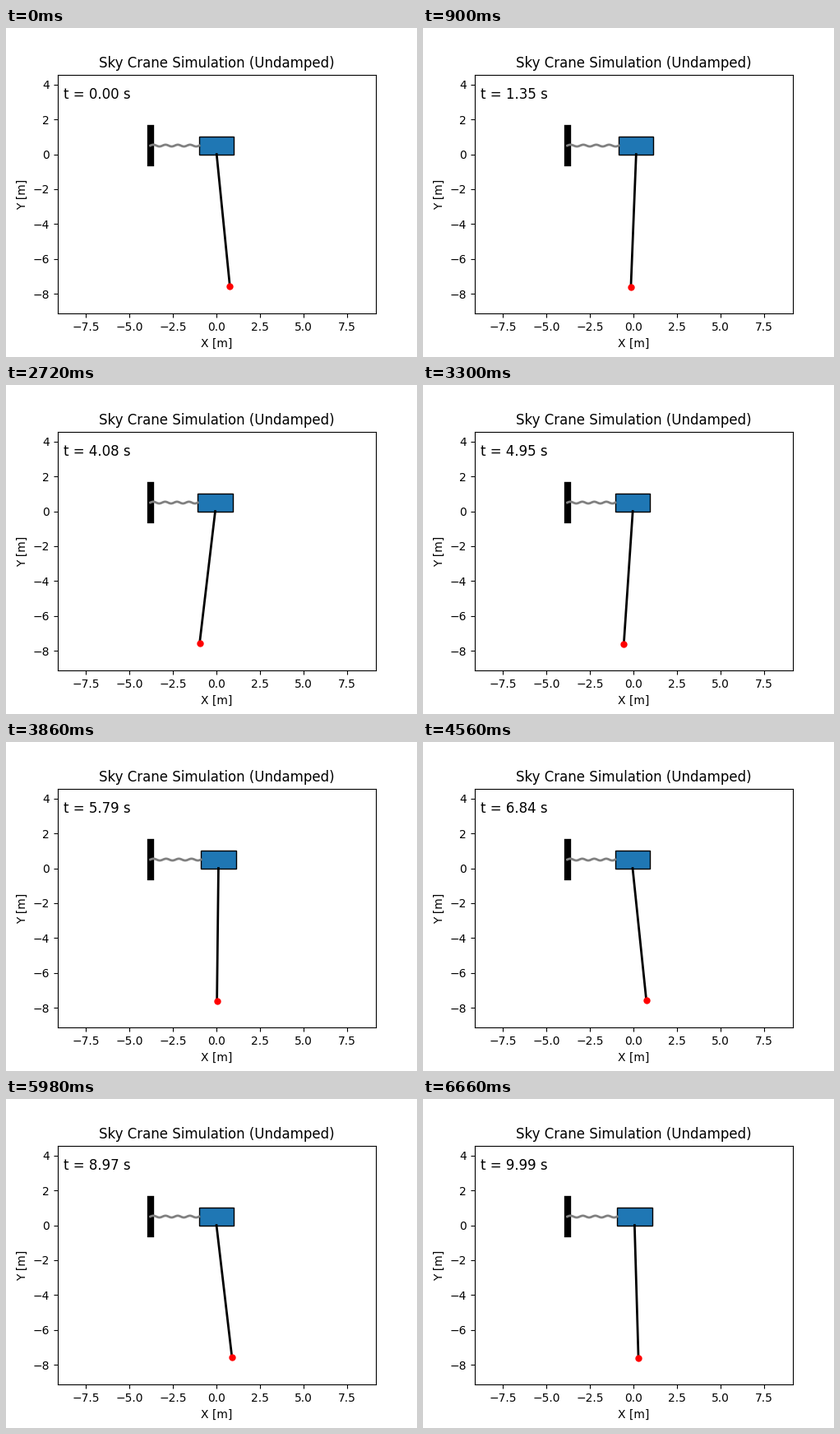
A matplotlib script for the animation above (6680 ms loop, 500 by 400 pixels).

```python
import numpy as np
import matplotlib.pyplot as plt
from matplotlib.animation import FuncAnimation
from matplotlib.patches import Rectangle

G = 3.71            # Mars gravity [m/s^2]
L = 7.62            # bridle length [m]
MASS_RATIO = 0.78   # payload mass / carriage mass
STIFFNESS = 9.27    # spring constant / carriage mass [1/s^2]
FRAMES, DT, SUBSTEPS = 334, 0.03, 6
CART_W, CART_H = 2.0, 1.0
WALL_X = -L / 2


def deriv(s):
    x, th, v, w = s
    sin, cos = np.sin(th), np.cos(th)
    acc = (-STIFFNESS * x + MASS_RATIO * sin * (G * cos + L * w**2)) / (1 + MASS_RATIO * sin**2)
    return np.array([v, w, acc, -(acc * cos + G * sin) / L])


def rk4(s, h):
    k1 = deriv(s)
    k2 = deriv(s + h / 2 * k1)
    k3 = deriv(s + h / 2 * k2)
    k4 = deriv(s + h * k3)
    return s + h / 6 * (k1 + 2 * k2 + 2 * k3 + k4)


def simulate():
    s = np.array([0.0, 0.1, -0.5, 0.0])
    states = [s]
    for _ in range(FRAMES - 1):
        for _ in range(SUBSTEPS):
            s = rk4(s, DT / SUBSTEPS)
        states.append(s)
    return np.array(states)


states = simulate()

fig, ax = plt.subplots(figsize=(5, 4), dpi=100)
ax.set_xlim(-1.2 * L, 1.2 * L)
ax.set_ylim(-1.2 * L, 0.6 * L)
ax.set_aspect("equal")
ax.set_xlabel("X [m]")
ax.set_ylabel("Y [m]")
ax.set_title("Sky Crane Simulation (Undamped)")

ax.plot([WALL_X, WALL_X], [-0.5, 1.5], color="black", lw=6)
cart = ax.add_patch(Rectangle((-CART_W / 2, 0), CART_W, CART_H, fc="tab:blue", ec="black"))
spring, = ax.plot([], [], color="gray", lw=2)
rope, = ax.plot([], [], color="black", lw=2)
load, = ax.plot([], [], "ro", ms=5)
clock = ax.text(0.02, 0.9, "", transform=ax.transAxes, fontsize=12)

u = np.linspace(0, 1, 100)
coil = CART_H / 2 + 0.05 * np.sin(8 * np.pi * u)


def update(i):
    x, th = states[i, :2]
    end_x, end_y = x + L * np.sin(th), -L * np.cos(th)
    left = x - CART_W / 2
    cart.set_x(left)
    spring.set_data(WALL_X + (left - WALL_X) * u, coil)
    rope.set_data([x, end_x], [0, end_y])
    load.set_data([end_x], [end_y])
    clock.set_text(f"t = {i * DT:.2f} s")
    return cart, spring, rope, load, clock


anim = FuncAnimation(fig, update, frames=FRAMES, interval=20, repeat=True, repeat_delay=0)
plt.show()
```
